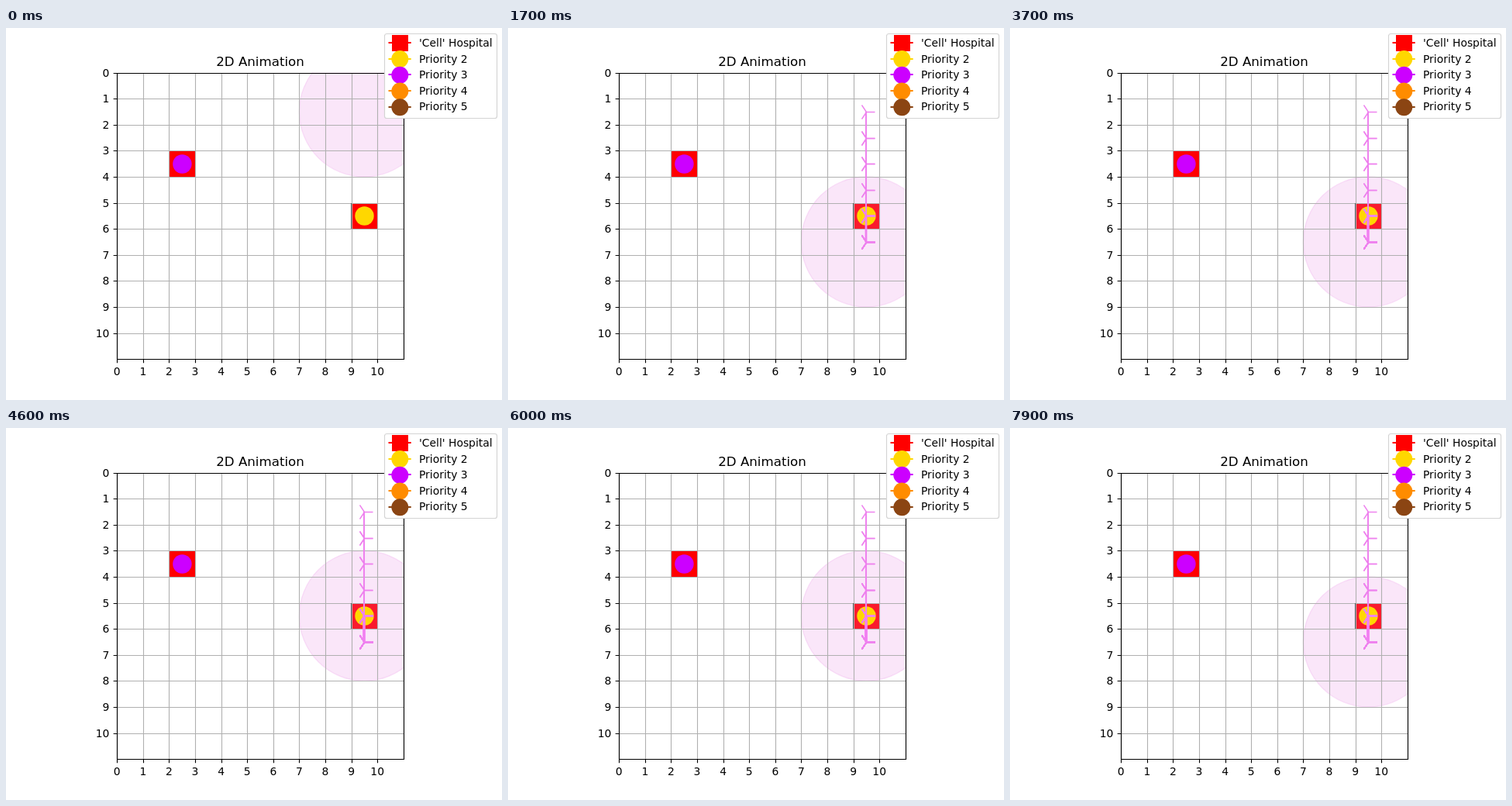
An HTML page that plays this animation: 640x480 px, repeating every 8 s.

```html
<!DOCTYPE html>
<html lang="en">
<head>
<meta charset="utf-8">
<title>2D Animation</title>
<style>
  html, body { margin: 0; width: 100%; height: 100%; overflow: hidden; background: #fff; }
  svg { display: block; }
  text { font: 13.89px "DejaVu Sans", sans-serif; fill: #000; }
  .title { font-size: 16.67px; }
</style>
</head>
<body>
<svg id="stage" width="640" height="480" viewBox="0 0 640 480">
  <clipPath id="axes"><rect x="143.2" y="57.6" width="369.6" height="369.6"/></clipPath>
</svg>
<script>
const STEP = 100, STEPS = 80;
const LEFT = 143.2, TOP = 57.6, CELL = 33.6, SIZE = 11;
const stage = document.getElementById('stage');

const px = x => LEFT + x * CELL;
const py = y => TOP + y * CELL;
const snap = v => Math.round(v) + 0.5;

function add(parent, tag, attrs, text) {
  const node = document.createElementNS('http://www.w3.org/2000/svg', tag);
  for (const key in attrs) node.setAttribute(key, attrs[key]);
  if (text !== undefined) node.textContent = text;
  parent.appendChild(node);
  return node;
}

const stroke = (parent, d, color, width) =>
  add(parent, 'path', { d, fill: 'none', stroke: color, 'stroke-width': width });

// Row of the agent: down to the hospital, then back and forth around it.
function rowAt(step) {
  if (step < 5) return 1.5 + step;
  if (step === 51) return 4.5;
  return step % 2 ? 6.5 : 5.5;
}

function drawCell(col, row) {
  const x = Math.round(px(col)), y = Math.round(py(row));
  add(stage, 'rect', {
    x, y, fill: '#f00',
    width: Math.round(px(col + 1)) - x,
    height: Math.round(py(row + 1)) - y
  });
}

function drawAxes() {
  let grid = '', ticks = '';
  const x0 = snap(px(0)), x1 = snap(px(SIZE));
  const y0 = snap(py(0)), y1 = snap(py(SIZE));
  for (let i = 0; i < SIZE; i++) {
    const x = snap(px(i)), y = snap(py(i));
    grid += `M${x} ${y0}V${y1}M${x0} ${y}H${x1}`;
    ticks += `M${x} ${y1}v4.86M${x0} ${y}h-4.86`;
  }
  stroke(stage, grid, '#b0b0b0', 1.11);
  return () => {
    stroke(stage, ticks, '#000', 1.11);
    stroke(stage, `M${x0} ${y0}H${x1}V${y1}H${x0}Z`, '#000', 1.11);
    for (let i = 0; i < SIZE; i++) {
      add(stage, 'text', { x: px(i), y: 448, 'text-anchor': 'middle' }, i);
      add(stage, 'text', { x: 133.3, y: Math.round(py(i) + 5), 'text-anchor': 'end' }, i);
    }
    add(stage, 'text', { class: 'title', x: 328, y: 49, 'text-anchor': 'middle' }, '2D Animation');
  };
}

function drawLegend() {
  add(stage, 'rect', {
    x: 488.5, y: 7.5, width: 145, height: 109, rx: 2.8,
    fill: '#fff', stroke: '#d4d4d4', 'stroke-width': 1.2
  });
  const rows = [
    ["'Cell' Hospital", '#f00'], ['Priority 2', '#ffd700'], ['Priority 3', '#cc00ff'],
    ['Priority 4', '#ff8c00'], ['Priority 5', '#8b4513']
  ];
  rows.forEach(([label, fill], i) => {
    const y = 19 + i * 20.7;
    stroke(stage, `M493.5 ${Math.round(y)}h29.2`, fill, 2.08);
    if (i) add(stage, 'circle', { cx: 508.3, cy: y + 0.4, r: 11, fill });
    else add(stage, 'rect', { x: 498, y: 9, width: 21, height: 21, fill });
    add(stage, 'text', { x: 533, y: Math.round(24 + i * 20.5) }, label);
  });
}

// One move: a segment with a three-armed marker at each end.
// Overlapping moves slowly thicken the line through its soft edges.
function drawMove(parent, from, to) {
  const group = add(parent, 'g', {});
  const x = Math.round(px(9.5));
  const ends = [from, to].map(r => Math.round(py(r)));
  stroke(group, `M${x} ${ends[0]}V${ends[1]}`, '#ee82ee', 2.08);
  for (const y of ends) {
    const c = `M${x + 0.5} ${y + 0.5}`;
    stroke(group, `${c}h11${c}l-6 9${c}l-6 -9`, '#ee82ee', 1.39);
  }
  return group;
}

drawCell(2, 3);
drawCell(9, 5);
const range = add(add(stage, 'g', { 'clip-path': 'url(#axes)' }), 'circle', {
  cx: px(9.5), r: 2.5 * CELL, fill: '#e480e2', 'fill-opacity': 0.2,
  stroke: '#e480e2', 'stroke-opacity': 0.2, 'stroke-width': 1.39
});
const finishAxes = drawAxes();
stroke(stage, 'M445.5 226V259', '#555', 1);
add(stage, 'circle', { cx: 227.4, cy: 175.5, r: 12.2, fill: '#cc00ff' });
add(stage, 'circle', { cx: 462.5, cy: 242.5, r: 12.2, fill: '#ffd700' });

const trail = add(stage, 'g', {});
const moves = [];
for (let i = 1; i < STEPS; i++) moves.push(drawMove(trail, rowAt(i - 1), rowAt(i)));
finishAxes();
drawLegend();

function render(time) {
  const step = Math.floor(time / STEP) % STEPS;
  range.setAttribute('cy', py(rowAt(step)));
  moves.forEach((move, i) => move.setAttribute('display', i < step ? 'inline' : 'none'));
}

const start = performance.now();
function tick() {
  render(performance.now() - start);
  requestAnimationFrame(tick);
}
tick();
</script>
</body>
</html>
```
